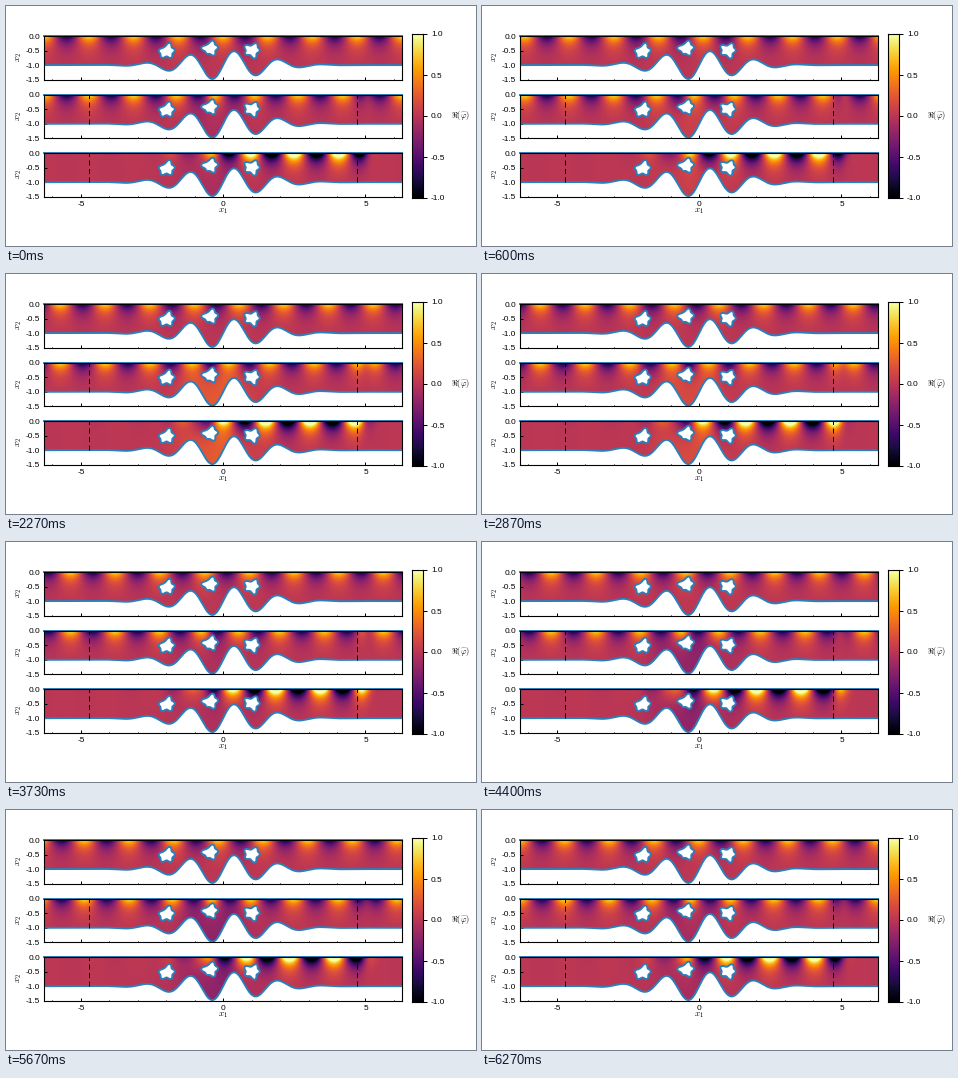
Recreate the animation shown at these times as a matplotlib script. Size 470 px wide and 240 px high, loop 6.31 s.

```python
import numpy as np
import matplotlib.pyplot as plt
from matplotlib.animation import FuncAnimation
from matplotlib.patches import PathPatch
from matplotlib.path import Path

W, H, DPI = 470, 240, 100
FRAMES, LOOP, FPS = 189, 6310, 30
PX = 72 / DPI                 # points per pixel
L, DEPTH = 2 * np.pi, 1.5
LEFT, WIDE, TALL = 38.3, 357.7, 43.2
SCALE = WIDE / (2 * L)        # pixels per unit
BLUE = "#2a80bb"
K, AMP, EDGE = 4, 1.0, 1.5 * np.pi

plt.rcParams.update({
    "font.family": "Liberation Sans",
    "font.size": 8.3 * PX,
    "mathtext.fontset": "cm",
    "axes.linewidth": 1.1 * PX,
})


def axes_px(x, y, w, h):
    return fig.add_axes([x / W, 1 - (y + h) / H, w / W, h / H])


def label(x, y, text, size=8, **kw):
    fig.text(x / W, 1 - y / H, text, fontsize=size * PX,
             ha="center", va="center", **kw)


def step(x, x0, width):
    return 0.5 * (1 + np.tanh((x - x0) / width))


def bed(x):
    return -1 + 0.5 * np.sin(4 * x) * np.exp(-x**2 / 4)


def blob(cx, cz, lobes, base=4.6):
    """Closed outline with rounded lobes given as (degrees, radius in px)."""
    a = np.linspace(-180, 180, 181)
    r = np.full_like(a, base)
    for angle, reach in lobes:
        d = (a - angle + 180) % 360 - 180
        r += (reach - base) * np.exp(-(d / 25) ** 2)
    a = np.radians(a)
    return cx + r * np.cos(a) / SCALE, cz + r * np.sin(a) / SCALE


BLOBS = [
    blob(-1.98, -0.51, [(68, 8.5), (5, 8), (-55, 8), (-130, 8.3), (178, 8)]),
    blob(-0.47, -0.42, [(178, 8.5), (65, 8.3), (8, 8.3), (-55, 8.3),
                        (-120, 6)]),
    blob(1.01, -0.49, [(148, 8.5), (55, 8.3), (0, 7.8), (-68, 8.5),
                       (208, 7.5)]),
]


def wave_fields():
    """Complex amplitudes: incident, total and scattered."""
    x = np.linspace(-L, L, 716)
    z = np.linspace(-DEPTH, 0, 86)
    x, z = np.meshgrid(x, z)
    decay = AMP * np.exp(K * z)
    incident = decay * np.exp(1j * K * x)
    lag = (0.3 * step(x, -1.95, 0.3) + 1.2 * step(x, -0.42, 0.35)
           + 0.52 * step(x, 1.02, 0.3))
    scattered = incident * (np.exp(1j * lag) - 1)
    scattered += 0.03 * decay * np.exp(-1j * K * x) * step(-x, 2, 0.4)
    gap = np.exp(-((x + 0.3) / 1.3) ** 2) * step(-z, 0.4, 0.3)
    scattered += 0.27 * gap * np.exp(1.9j)
    beyond = np.maximum(np.abs(x) - EDGE, 0)
    scattered *= np.exp(-(beyond / 0.4) ** 2)
    return incident, incident + scattered, scattered


def panel(y, dashed, ticklabels):
    ax = axes_px(LEFT, y, WIDE, TALL)
    img = ax.imshow(np.zeros((2, 2)), cmap="inferno", vmin=-1, vmax=1,
                    extent=(-L, L, -DEPTH, 0), origin="lower",
                    aspect="auto", interpolation="bilinear")
    x = np.linspace(-L, L, 600)
    floor = np.column_stack([x, bed(x)])
    water = np.vstack([floor, [(L, 0), (-L, 0)], floor[:1]])
    img.set_clip_path(PathPatch(Path(water), transform=ax.transData))
    ax.plot(x, bed(x), color=BLUE, lw=1.9 * PX)
    ax.plot([-L, L], [0, 0], color=BLUE, lw=1.9 * PX, clip_on=False)
    for bx, bz in BLOBS:
        ax.fill(bx, bz, fc="white", ec=BLUE, lw=1.9 * PX, zorder=3)
    if dashed:
        for edge in (-EDGE, EDGE):
            ax.plot([edge, edge], [-1, 0], color="black", lw=PX,
                    dashes=(5, 3.5), zorder=2)
    ax.set(xlim=(-L, L), ylim=(-DEPTH, 0), xticks=[-5, 0, 5],
           yticks=[0, -0.5, -1, -1.5])
    ax.set_xticks(range(-6, 7), minor=True)
    ax.set_yticklabels(["0.0", "-0.5", "-1.0", "-1.5"])
    ax.set_xticklabels(["-5", "0", "5"] if ticklabels else [])
    ax.tick_params(direction="in", length=3 * PX, width=PX, pad=4 * PX)
    ax.tick_params(which="minor", direction="in", length=1.5 * PX,
                   width=PX)
    label(13.5, y + TALL / 2 - 1, "$x_2$", 9, rotation=90)
    return img


def colorbar():
    ax = axes_px(406.3, 28, 10.7, 164)
    ax.imshow(np.linspace(-1, 1, 256)[:, None], cmap="inferno",
              extent=(0, 1, -1, 1), origin="lower", aspect="auto")
    ax.set(xticks=[], yticks=[-1, -0.5, 0, 0.5, 1])
    ax.set_yticklabels(["-1.0", "-0.5", "0.0", "0.5", "1.0"])
    ax.yaxis.tick_right()
    ax.tick_params(length=4 * PX, width=PX, pad=4 * PX)
    label(454, 109.5, r"$\Re(\widehat{\varphi})$", 8.3)


fig = plt.figure(figsize=(W / DPI, H / DPI), dpi=DPI, facecolor="white")
images = [panel(30.3, False, False), panel(89, True, False),
          panel(147.4, True, True)]
label(217, 205.5, "$x_1$", 9)
colorbar()
fields = wave_fields()


def update(i):
    turn = np.exp(-1j * i / FPS)
    for img, field in zip(images, fields):
        img.set_data((field * turn).real)
    return images


anim = FuncAnimation(fig, update, frames=FRAMES, interval=LOOP / FRAMES,
                     repeat=True, repeat_delay=0)
plt.show()
```
